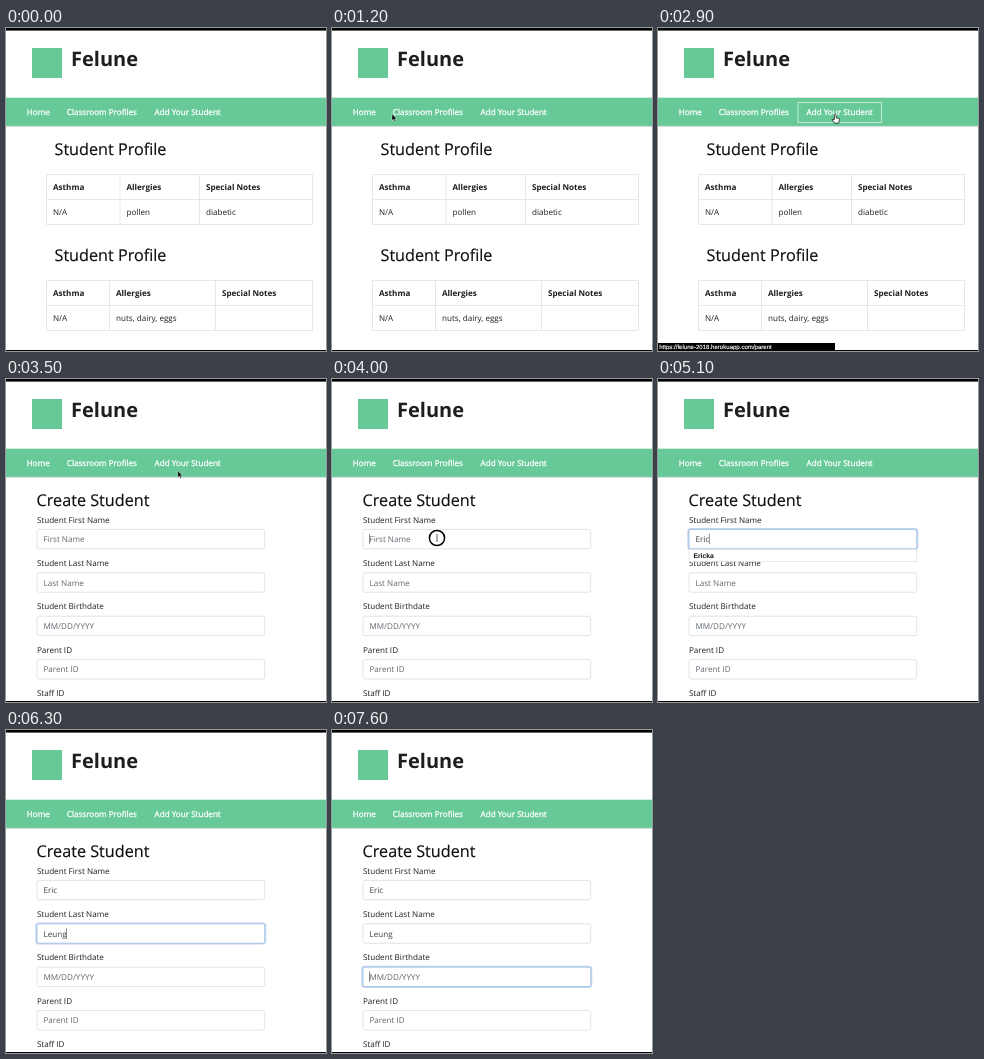
Animation of 320x323 px, one loop 8 s. Source, as an HTML page:

```html
<!DOCTYPE html>
<html lang="en">
<head>
<meta charset="utf-8">
<title>Student form</title>
<style>
html, body { margin: 0; width: 100%; height: 100%; overflow: hidden; background: #fff; }
svg { display: block; width: 320px; height: 323px; }
text { font: 8.1px "Open Sans", sans-serif; fill: #1c1e20; white-space: pre; text-rendering: geometricPrecision; }
.brand { font-size: 20px; font-weight: 700; }
.title { font-size: 16.2px; fill: #0c0d0e; stroke: #0c0d0e; stroke-width: .15px; }
.head { font-weight: 700; }
.nav { fill: #fff; stroke: #fff; stroke-width: .3px; }
.hint { fill: #606870; }
.value { fill: #3c4248; }
.small { font: 6.07px "Liberation Sans", Arial, sans-serif; fill: #fff; stroke: #fff; stroke-width: .15px; }
.option { font: 700 6.8px "Liberation Sans", Arial, sans-serif; fill: #111; }
</style>
</head>
<body>
<svg id="stage" viewBox="0 0 320 323"></svg>
<script>
const LOOP = 8000, HOST = 'felune-2018.herokuapp.com';
const stage = document.getElementById('stage');
const text = (x, y, s, cls = '', id = '') => `<text x="${x}" y="${y}" class="${cls}" id="${id}">${s}</text>`;
const rect = (x, y, w, h, attrs) => `<rect x="${x}" y="${y}" width="${w}" height="${h}" ${attrs}/>`;

function table(y, cols, heads, cells) {
  const lines = cols.map(x => `M${x} ${y}v50`).join('');
  return text(48.5, y - 20, 'Student Profile', 'title') +
    `<path d="M40.5 ${y}h266v50h-266zM40.5 ${y + 25}h266${lines}" fill="none" stroke="#e6e9ec"/>` +
    [40.5, ...cols].map((x, i) =>
      text(x + 6.5, y + 15.4, heads[i], 'head') + text(x + 6.5, y + 40.6, cells[i])).join('');
}

const heads = ['Asthma', 'Allergies', 'Special Notes'];
const labels = ['Student First Name', 'Student Last Name', 'Student Birthdate', 'Parent ID', 'Staff ID'];
const hints = ['First Name', 'Last Name', 'MM/DD/YYYY', 'Parent ID', 'Staff ID'];
const rowY = i => 150.4 + i * 43.4;

const field = (label, i) => text(30.9, rowY(i) - 6.9, label) +
  rect(30.2, rowY(i) - .5, 229.2, 20.4, `rx="2.6" fill="none" stroke="#4a86d8" stroke-width="1.7" opacity="0" id="ring${i}"`) +
  rect(31, rowY(i), 227.7, 19.4, `rx="2" fill="#fff" stroke="#d9dde1" stroke-width=".8" id="box${i}"`) +
  text(37.5, rowY(i) + 12.7, hints[i], 'hint', 'input' + i);

stage.innerHTML =
  rect(0, 0, 320, 323, 'fill="#fff"') +
  rect(26, 20, 30, 30, 'fill="#66c997"') +
  text(65, 38, 'Felune', 'brand') +
  rect(0, 98, 320, 1, 'fill="#d5dcd8"') +
  rect(0, 69.7, 320, 28.2, 'fill="#66c997"') +
  text(20.8, 87.4, 'Home', 'nav') + text(60.8, 87.4, 'Classroom Profiles', 'nav') + text(148.6, 87.4, 'Add Your Student', 'nav') +
  rect(0, 74.5, 83.5, 20, 'fill="none" stroke="#fff" stroke-opacity=".75" stroke-width=".8" id="hover"') +
  '<g id="profiles">' +
    table(146.5, [114, 193.5], heads, ['N/A', 'pollen', 'diabetic']) +
    table(252.5, [103.5, 209.5], heads, ['N/A', 'nuts, dairy, eggs', '']) +
  '</g><g id="form">' +
    text(30.6, 126.9, 'Create Student', 'title') + labels.map(field).join('') +
    rect(0, 0, .6, 10.5, 'fill="#444" id="caret"') +
    '<g id="list">' + rect(31, 170.5, 227.7, 12, 'fill="#fff" stroke="#ddd" stroke-width=".6"') +
    text(35.4, 179, 'Ericka', 'option') + '</g>' +
  '</g>' +
  '<g id="status">' + rect(0, 315, 177, 8, '') + text(1.2, 320.6, '', 'small', 'url') + '</g>' +
  rect(0, 0, 320, 2.6, '') + rect(0, 322, 320, 1, '') +
  '<g id="pointer">' +
    '<path id="arrow" d="M0 0V6.6L1.5 5.3 2.5 7.6 3.6 7.1 2.6 4.9H4.6Z" stroke="#fff" stroke-width=".4"/>' +
    '<path id="hand" d="M-1 .9a.9.9 0 0 1 1.8 0V3.5l2.7.6q.8.3.6 1.1L3.5 8.8H-.8L-3.2 5.3q.6-1 2.2.2z" fill="#fff" stroke="#000" stroke-width=".7"/>' +
    '<g id="beam" fill="none" stroke="#000"><circle id="press" r="7.6" fill="#fff" fill-opacity=".7" stroke-width="1.5"/>' +
    '<path d="M-1.3-3.5Q0-3.5 0-2.5V2.5Q0 3.5-1.3 3.5M1.3-3.5Q0-3.5 0-2.5V2.5Q0 3.5 1.3 3.5" stroke="#444" stroke-width=".5"/></g>' +
  '</g>';

const $ = id => document.getElementById(id);
const show = (id, on) => $(id).style.display = on ? '' : 'none';

// time, x, y of the pointer
const path = [[500, 236, 130], [1200, 60, 86], [1400, 68, 86], [2200, 96, 86],
  [2900, 177.3, 86.3], [3400, 177.3, 86.3], [4000, 105, 159]];

// key press times; doubled times enter two letters at once
const entries = [
  { from: 4000, to: 5400, word: 'Eric', keys: [4500, 4700, 4900, 5100] },
  { from: 5400, to: 6500, word: 'Leung', keys: [5800, 6000, 6100, 6100, 6300] },
  { from: 6500, to: LOOP, word: '', keys: [] }
];

function pointerAt(t) {
  const i = path.findIndex(p => p[0] > t);
  if (i < 0) return path[path.length - 1].slice(1);
  if (i === 0) return path[0].slice(1);
  const [t0, x0, y0] = path[i - 1], [t1, x1, y1] = path[i];
  const k = (t - t0) / (t1 - t0), e = k * k * (3 - 2 * k);
  return [x0 + (x1 - x0) * e, y0 + (y1 - y0) * e];
}

function drawField({ from, to, word, keys }, i, t) {
  const typed = keys.filter(k => k <= t);
  const input = $('input' + i), value = word.slice(0, typed.length);
  input.textContent = value || hints[i];
  input.setAttribute('class', value ? 'value' : 'hint');
  const active = t >= from && t < to;
  const glow = active ? Math.min(1, (t - from) / 150) : 0;
  $('ring' + i).setAttribute('opacity', glow * .35);
  $('box' + i).setAttribute('stroke', glow > .4 ? '#9dbbe0' : '#d9dde1');
  if (!active) return;
  const last = Math.max(from, ...typed);
  show('caret', (t - last) % 1000 < 500);
  $('caret').setAttribute('x', 37.2 + (value ? input.getComputedTextLength() : 0));
  $('caret').setAttribute('y', rowY(i) + 4.4);
}

function draw(t) {
  const onForm = t >= 3400, onLink = t >= 1400 && !onForm, adding = t >= 2600;
  show('profiles', !onForm);
  show('form', onForm);
  show('hover', onLink);
  show('status', onLink);
  $('hover').setAttribute('x', adding ? 140 : 52.5);
  $('hover').setAttribute('width', adding ? 83.5 : 87);
  $('url').textContent = t >= 3200 ? `Waiting for ${HOST}...` : `https://${HOST}/${adding ? 'parent' : 'classroom'}`;

  show('caret', false);
  if (onForm) entries.forEach((entry, i) => drawField(entry, i, t));
  show('list', t >= 4600 && t < 5400);

  show('pointer', t >= 500 && t < 4500);
  $('pointer').setAttribute('transform', `translate(${pointerAt(t)})`);
  show('hand', onLink);
  show('beam', t >= 3800);
  show('arrow', !onLink && t < 3800);
  show('press', t >= 3950 && t < 4100);
}

const start = performance.now();
function tick() {
  draw((performance.now() - start) % LOOP);
  requestAnimationFrame(tick);
}
tick();
</script>
</body>
</html>
```
